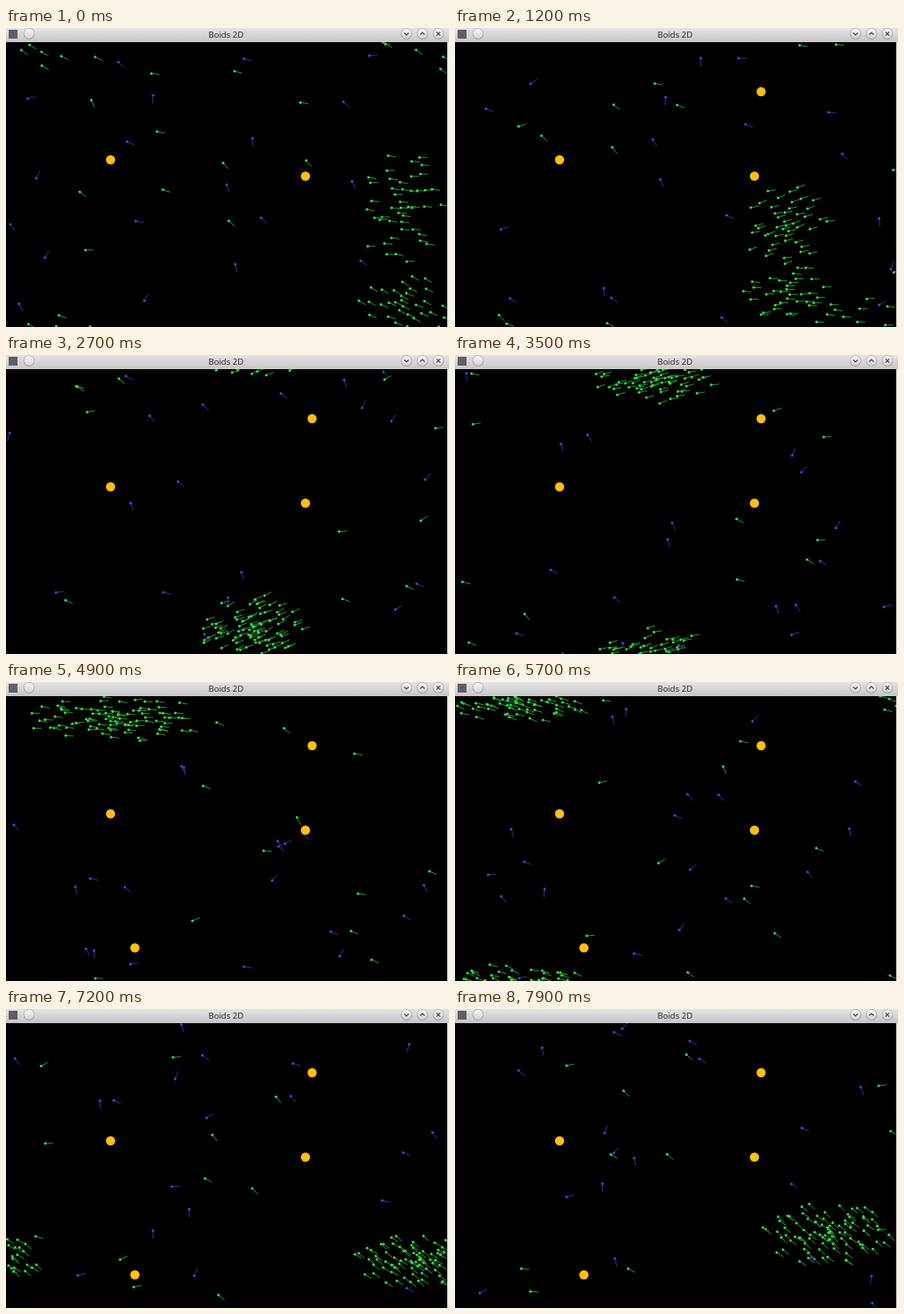
Animation, 500 px wide and 338 px high, one loop 8 s. Source, as an HTML page with a canvas:

```html
<!DOCTYPE html>
<html>
<head>
<meta charset="utf-8">
<style>
  html, body { margin: 0; width: 100%; height: 100%; overflow: hidden; background: #000; }
  canvas { display: block; }
</style>
</head>
<body>
<canvas id="stage" width="500" height="338"></canvas>
<script>
const ctx = document.getElementById('stage').getContext('2d');
const LOOP = 8000, STEP = 100, W = 498, TOP = 16, H = 322;
const GREEN = ['#30e043', '#209a2e'], BLUE = ['#4e41e0', '#372da2'];

let seed = 11;
const rand = () => (seed = (seed * 16807) % 2147483647) / 2147483647;
const vary = (mid, range) => mid + (rand() * 2 - 1) * range;
const mod = (a, n) => ((a % n) + n) % n;

// Flock: time, centre x and y, radius x and y, tail angle in degrees.
// Coordinates run past the edges; drawing wraps them.
const keys = [
  [0, 444, 204, 49, 66, 5],
  [1200, 372, 224, 50, 46, -15],
  [2000, 322, 265, 54, 46, -28],
  [3500, 225, 351, 68, 28, -14],
  [4900, 122, 369, 96, 22, 6],
  [6400, 18, 317, 74, 25, 30],
  [7900, -79, 253, 74, 36, 39]
];

// Smooth curve through one column of the keys (cubic Hermite).
function curve(col, t) {
  const last = keys.length - 1;
  let i = 0;
  while (i < last - 1 && t >= keys[i + 1][0]) i++;
  const slope = j => {
    const a = keys[Math.max(j - 1, 0)], b = keys[Math.min(j + 1, last)];
    return (b[col] - a[col]) / (b[0] - a[0]);
  };
  const a = keys[i], b = keys[i + 1], d = b[0] - a[0];
  const s = (t - a[0]) / d, s2 = s * s, s3 = s2 * s;
  return (2 * s3 - 3 * s2 + 1) * a[col] + (s3 - 2 * s2 + s) * d * slope(i)
    + (3 * s2 - 2 * s3) * b[col] + (s3 - s2) * d * slope(i + 1);
}

// Squads start away from the main flock and swing into it.
const squads = [
  { size: 45, dx: 0, dy: 0, wide: 1, turn: 0 },
  { size: 28, dx: 0, dy: 104, wide: 1, turn: 20 },
  { size: 18, dx: 75, dy: 138, wide: 1.9, turn: 25 }
];
for (const s of squads) {
  s.members = Array.from({ length: s.size }, (_, i) => ({
    angle: vary(i * 2.4, 0.4),
    radius: ((i + 0.5) / s.size) ** 0.75,
    phase: rand() * 6.28,
    tilt: vary(0, 0.15)
  }));
}

// Lone boids: evenly scattered starts, a steady course and a gentle sway.
const scatter = (count, x, y, w, h, spread) => Array.from({ length: count }, (_, i) => ({
  x: x + w * mod(0.5 + i * 0.7549, 1),
  y: y + h * mod(0.5 + i * 0.5698, 1),
  course: vary(3.4, spread),
  speed: vary(0.08, 0.012),
  sway: vary(24, 10),
  rate: vary(0.0013, 0.0004),
  phase: rand() * 6.28
}));
const blues = scatter(19, 0, TOP, W, H, 1.3);
const greens = scatter(11, 80, 35, 330, 235, 0.6);

// Food spots: x, y, time of appearance.
const food = [[118, 149, 0], [338, 167.5, 0], [345.5, 72, 700], [145.5, 300.5, 4300]];

function disc(x, y, r, fill) {
  ctx.fillStyle = fill;
  ctx.beginPath();
  ctx.arc(x, y, r, 0, 7);
  ctx.fill();
}

function line(points, color, width) {
  ctx.strokeStyle = color;
  ctx.lineWidth = width;
  ctx.beginPath();
  points.forEach(([x, y]) => ctx.lineTo(x, y));
  ctx.stroke();
}

function boid(x, y, tail, [head, trail]) {
  x = mod(x, W);
  y = TOP + mod(y - TOP, H);
  line([[x, y], [x + 9 * Math.cos(tail), y + 9 * Math.sin(tail)]], trail, 1);
  disc(x, y, 1.5, head);
}

function drawLone(b, t, colors) {
  const cos = Math.cos(b.course), sin = Math.sin(b.course);
  const wave = b.rate * t + b.phase;
  const along = b.speed * t, side = b.sway * (Math.sin(wave) - Math.sin(b.phase));
  const lean = Math.atan2(b.sway * b.rate * Math.cos(wave), b.speed);
  boid(b.x + along * cos - side * sin, b.y + along * sin + side * cos,
    b.course + lean + Math.PI, colors);
}

function drawSquad(s, t) {
  const [cx, cy, rx, ry, deg] = [1, 2, 3, 4, 5].map(col => curve(col, t));
  const lag = Math.exp(-((t / 3300) ** 2)) * Math.cos(Math.PI * t / 5700);
  const w = rx * (1 + (s.wide - 1) * lag), h = ry * (s.dy ? 1 - 0.5 * lag : 1);
  const tail = (deg + s.turn * lag) * Math.PI / 180;
  for (const m of s.members) {
    const a = m.angle + 0.25 * Math.sin(t / 1400 + m.phase);
    boid(cx + s.dx * lag + w * m.radius * Math.cos(a),
      cy + s.dy * lag + h * m.radius * Math.sin(a), tail + m.tilt, GREEN);
  }
}

function vertical(height, from, to) {
  const shade = ctx.createLinearGradient(0, 0, 0, height);
  shade.addColorStop(0, from);
  shade.addColorStop(1, to);
  return shade;
}

function titleBar() {
  ctx.fillStyle = vertical(TOP, '#e4e4e5', '#c6c6c8');
  ctx.fillRect(0, 0, 500, TOP);
  ctx.fillStyle = '#e6e6e8';
  ctx.fillRect(W, TOP, 2, H);
  ctx.fillStyle = '#606064';
  ctx.fillRect(3, 2, 10, 10);
  for (const x of [26, 452, 470, 488]) {
    disc(x, 6.5, 6.3, '#9b9b9d');
    disc(x, 6.3, 5.6, vertical(13, '#fafafa', '#cfcfd0'));
  }
  const ink = '#444';
  line([[449.5, 5.5], [452, 8], [454.5, 5.5]], ink, 1.2);
  line([[467.5, 7.5], [470, 5], [472.5, 7.5]], ink, 1.2);
  line([[485.8, 4.3], [490.2, 8.7]], ink, 1.2);
  line([[490.2, 4.3], [485.8, 8.7]], ink, 1.2);
  ctx.fillStyle = '#2c2c2c';
  ctx.font = '9.5px "Noto Sans", "Open Sans", sans-serif';
  ctx.textAlign = 'center';
  ctx.fillText('Boids 2D', 248.3, 10.5);
}

function draw(t) {
  ctx.fillStyle = '#000';
  ctx.fillRect(0, 0, 500, 338);
  squads.forEach(s => drawSquad(s, t));
  greens.forEach(b => drawLone(b, t, GREEN));
  blues.forEach(b => drawLone(b, t, BLUE));
  for (const [x, y, from] of food) if (t >= from) disc(x, y, 5.2, '#ffc000');
  titleBar();
}

const start = performance.now();
function tick() {
  const t = (performance.now() - start) % LOOP;
  draw(Math.floor(t / STEP) * STEP);
  requestAnimationFrame(tick);
}
tick();
</script>
</body>
</html>
```
